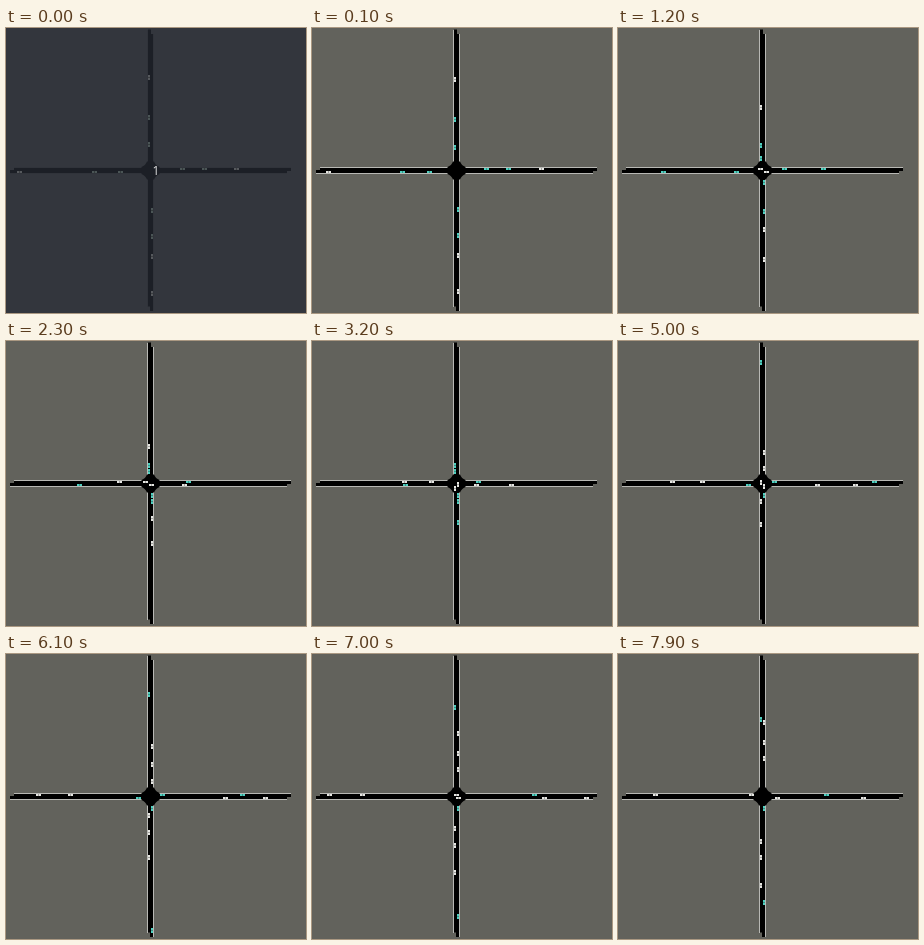
Write an HTML page with a canvas that moves like this. It is 300 by 285 pixels and loops after 8 s.

```html
<!DOCTYPE html>
<html>
<head>
<meta charset="utf-8">
<style>
  html, body { margin: 0; overflow: hidden; }
  canvas { display: block; }
</style>
</head>
<body>
<canvas id="stage" width="300" height="285"></canvas>
<script>
const ctx = document.getElementById('stage').getContext('2d');
const LOOP = 8000, TICK = 100, GAP = 6;

const LIGHT = { ground: '#62625c', road: '#000', edge: '#b8b8b4', teal: '#4fd0c0', white: '#e6e6e2' };
const DIM = { ground: '#33363d', road: '#1c1f26', edge: '#30333a', teal: '#4b5556', white: '#56595d' };

// side: first pixel across the road; stop: where a car waits; min/max: visible stretch
const LANES = {
  south: { vertical: true, side: 142, dir: 1, stop: 130, min: 2, max: 285, centre: 142 },
  north: { vertical: true, side: 145, dir: -1, stop: 154, min: 0, max: 282, centre: 142 },
  west: { side: 140, dir: -1, stop: 156, min: 11, max: 286, centre: 145 },
  east: { side: 143, dir: 1, stop: 132, min: 0, max: 279, centre: 145 },
};

// Front car first in each lane. leave: step at which a waiting car may go;
// cars without it cross freely. signal: step at which an approaching car turns teal.
const CARS = [
  { lane: 'west', start: 174, speed: 1.05 },
  { lane: 'west', start: 196, speed: 0.98 },
  { lane: 'west', start: 229, speed: 0.8, leave: 48, signal: 4 },
  { lane: 'west', start: 371, speed: 1 },
  { lane: 'east', start: 117, speed: 1.06 },
  { lane: 'east', start: 90, speed: 0.96 },
  { lane: 'east', start: 16, speed: 1, leave: 48, signal: 4 },
  { lane: 'south', start: 119, speed: 1, leave: 19 },
  { lane: 'south', start: 91, speed: 0.9, leave: 26 },
  { lane: 'south', start: 51, speed: 0.95, leave: 34, signal: 24 },
  { lane: 'south', start: -83.5, speed: 0.92, signal: 36 },
  { lane: 'north', start: 181, speed: 0.9, leave: 21 },
  { lane: 'north', start: 207, speed: 0.8, leave: 26 },
  { lane: 'north', start: 227, speed: 0.86, leave: 35, signal: 24 },
  { lane: 'north', start: 263, speed: 1.05, leave: Infinity, signal: 24 },
  { lane: 'north', start: 411, speed: 1 },
];

// The simulation rests on every fifth tick
const stepAt = tick => Math.max(-0.6, tick - 1 - Math.floor((tick + 1) / 5));

// Distance driven, with traffic slowing gently
const cruise = s => 3.45 * s - 0.0135 * s * s;

function position(car, lane, s, ahead) {
  const driven = car.speed * cruise(s);
  let pos = car.start + lane.dir * driven;
  if (s >= car.leave) pos = lane.stop + lane.dir * (driven - car.speed * cruise(car.leave));
  const limits = [pos];
  if (s < car.leave) limits.push(lane.stop);
  if (ahead !== undefined) limits.push(ahead - lane.dir * GAP);
  return lane.dir > 0 ? Math.min(...limits) : Math.max(...limits);
}

function rect(color, x, y, w, h) {
  ctx.fillStyle = color;
  ctx.fillRect(x, y, w, h);
}

function drawRoads(c) {
  rect(c.edge, 141, 2, 1, 277);
  rect(c.edge, 147, 6, 1, 277);
  rect(c.edge, 8, 139, 277, 1);
  rect(c.edge, 4, 145, 277, 1);
  rect(c.road, 142, 1.5, 3, 277);
  rect(c.road, 144, 6, 3, 277);
  rect(c.road, 8, 140, 277, 3);
  rect(c.road, 4, 142, 277, 3);
  // Junction with bevelled inner corners
  ctx.fillStyle = c.road;
  ctx.beginPath();
  ctx.moveTo(141, 133.5);
  ctx.lineTo(148, 133.5);
  ctx.quadraticCurveTo(149.5, 137.5, 153.5, 139);
  ctx.lineTo(153.5, 146);
  ctx.quadraticCurveTo(149.5, 147.5, 148, 151.5);
  ctx.lineTo(141, 151.5);
  ctx.quadraticCurveTo(139.5, 147.5, 135.5, 146);
  ctx.lineTo(135.5, 139);
  ctx.quadraticCurveTo(139.5, 137.5, 141, 133.5);
  ctx.fill();
}

function drawCar(lane, pos, color) {
  const p = Math.round(pos - 2.5);
  const part = (from, length, fill) => lane.vertical
    ? rect(fill, lane.side, from, 2, length)
    : rect(fill, from, lane.side, length, 2);
  part(p, 5, color);
  part(p + 2, 1, 'rgba(0,0,0,.3)');
}

function drawCars(s, c) {
  const last = {};
  for (const car of CARS) {
    const lane = LANES[car.lane];
    const pos = last[car.lane] = position(car, lane, s, last[car.lane]);
    if (pos < lane.min || pos > lane.max) continue;
    const approaching = (lane.centre - pos) * lane.dir > 6;
    const signalled = s >= (car.signal ?? -1);
    drawCar(lane, pos, approaching && signalled ? c.teal : c.white);
  }
}

function draw(now) {
  const tick = Math.floor(now % LOOP / TICK);
  const colors = tick === 0 ? DIM : LIGHT;
  rect(colors.ground, 0, 0, 300, 285);
  drawRoads(colors);
  drawCars(stepAt(tick), colors);
  if (tick === 0) {
    ctx.fillStyle = '#e4e4e4';
    ctx.font = '12px "Open Sans", sans-serif';
    ctx.fillText('1', 146.5, 147);
  }
}

const begin = performance.now();
function frame() {
  draw(performance.now() - begin);
  requestAnimationFrame(frame);
}
frame();
</script>
</body>
</html>
```
